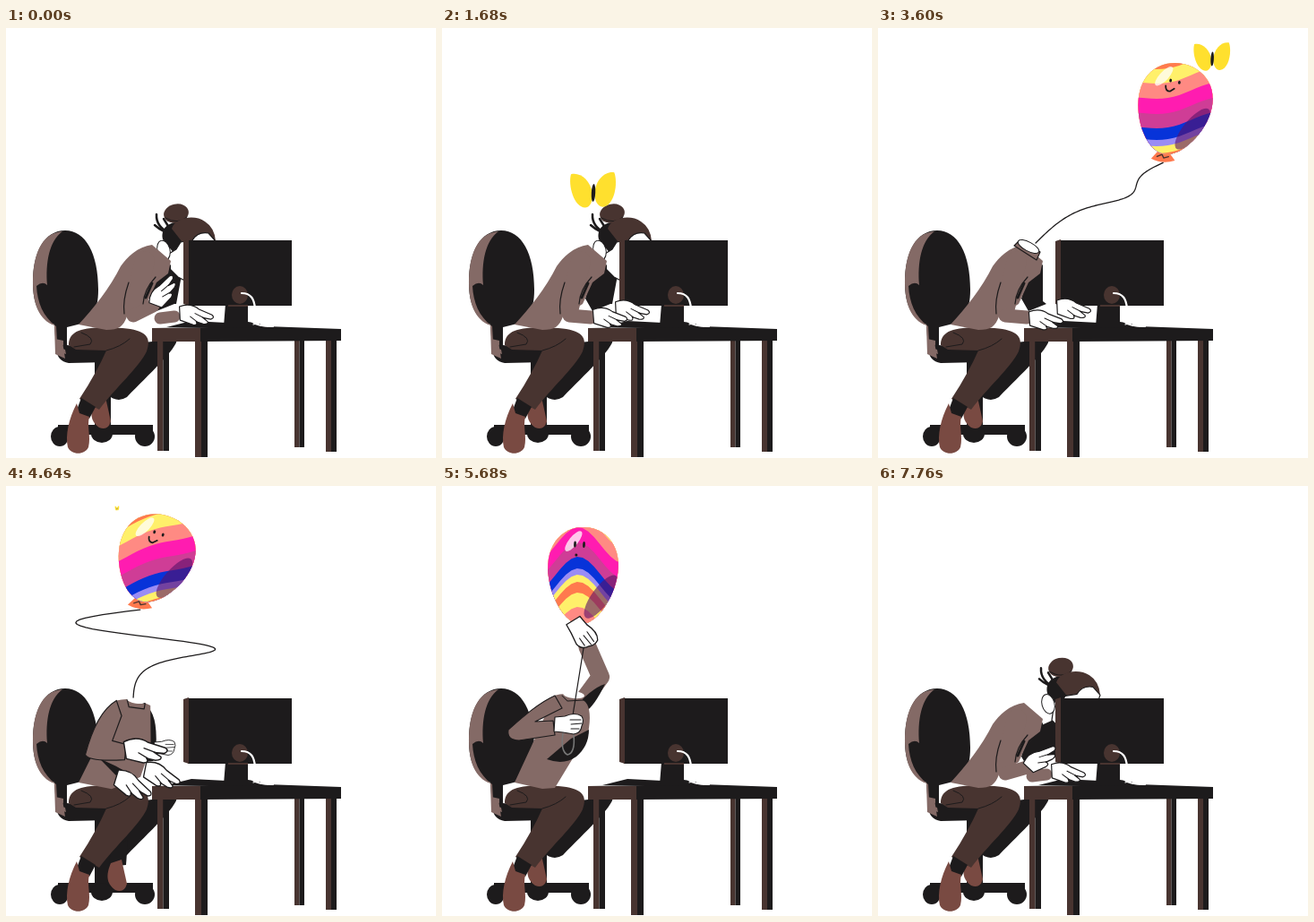
Write an HTML page that moves like this. It is 480 px wide and 480 px high and loops after 7.84 s.

```html
<!DOCTYPE html>
<html lang="en">
<head>
<meta charset="utf-8">
<title>Balloon head at the desk</title>
<style>
html, body { margin: 0; width: 100%; height: 100%; overflow: hidden; background: #fff }
svg { display: block; width: 100vw; height: 100vh }
</style>
</head>
<body>
<svg id="stage" viewBox="0 0 480 480"></svg>
<script>
const LOOP = 7840;
const K = '#1d1b1c', D = '#483430', S = '#846a66', SHOE = '#794a42', W = '#fff';
const PINK = '#ff1cb0', PLUM = '#cf3d96', CORAL = '#ff8a83', BLUE = '#0733d9',
  LILAC = '#9a8cf5', SUN = '#fff06a', ORANGE = '#ff7a4e', GOLD = '#ffe02e';

// Drawing helpers
const fill = (d, c, extra = '') => `<path d="${d}" fill="${c}" ${extra}/>`;
const line = (d, c = K, w = 1.2) => `<path d="${d}" fill="none" stroke="${c}" stroke-width="${w}" stroke-linecap="round" stroke-linejoin="round"/>`;
const inked = (d, c = W) => fill(d, c, `stroke="${K}" stroke-width="1.2" stroke-linejoin="round"`);
const oval = (x, y, rx, ry, c, rot = 0, extra = '') =>
  `<ellipse cx="${x}" cy="${y}" rx="${rx}" ry="${ry}" fill="${c}" transform="rotate(${rot} ${x} ${y})" ${extra}/>`;
const box = (x, y, w, h, c) => `<rect x="${x}" y="${y}" width="${w}" height="${h}" fill="${c}"/>`;
const group = (tf, s) => `<g transform="${tf}">${s}</g>`;

// Motion helpers
const mix = (a, b, u) => a + (b - a) * u;
const clamp = u => Math.max(0, Math.min(1, u));
const ramp = (t, a, b) => { const u = clamp((t - a) / (b - a)); return u * u * (3 - 2 * u); };
const bell = (t, mid, width) => Math.exp(-(((t - mid) / width) ** 2));
const trace = (n, f) => 'M' + Array.from({ length: n + 1 }, (_, i) => f(i / n).map(v => v.toFixed(2))).join('L');

// Smooth interpolation through rows of [time, ...values]
function key(t, rows) {
  let i = 0;
  while (i < rows.length - 2 && t >= rows[i + 1][0]) i++;
  const a = rows[i], b = rows[i + 1], z = rows[i - 1] || a, c = rows[i + 2] || b;
  const h = b[0] - a[0], u = clamp((t - a[0]) / h), v = 1 - u;
  return a.slice(1).map((p, n) => {
    const j = n + 1, q = b[j];
    const m0 = (q - z[j]) / (b[0] - z[0]) * h, m1 = (c[j] - p) / (c[0] - a[0]) * h;
    return v * v * (1 + 2 * u) * p + u * v * v * m0 + u * u * (3 - 2 * u) * q - u * u * v * m1;
  });
}

// Furniture
const chair =
  fill('M66 226C89 226 103 252 103 292C103 317 95 327 80 331L68 334V354L104 358 190 348Q190 358 160 372L70 374Q57 372 56 358L54 331C36 324 30 306 30 284C30 250 43 226 66 226Z', K) +
  fill('M63 227C38 229 30 256 30 284C30 308 37 326 54 332L55 364 66 369 63 350 57 349 56 333C41 322 35 306 34 288Q41 282 46 287C44 262 48 238 63 227Z', S) +
  fill('M55 347L64 349 64 354 56 352ZM56 356L66 359 67 364 57 361Z', S) +
  box(99, 370, 18, 78, K) + box(58, 443, 106, 11, K) +
  oval(60, 456, 10, 11, K) + oval(155, 456, 11, 11, K) + oval(107, 453, 12, 10, K);

const legs = apart =>
  fill('M145 352L191 347C191 358 160 386 135 412Q124 419 113 409Z', K) +
  group(apart ? 'translate(18 5)' : '',
    fill('M99 398L118 390 116 418 97 420Z', K) + fill('M99 416C94 428 93 438 104 446Q114 450 117 439L111 412Z', SHOE)) +
  fill('M70 354C70 338 84 332 130 335C156 337 163 345 157 361C149 378 122 402 104 426L82 414C95 394 105 376 112 360L78 359Z', D) +
  line('M84 340Q100 346 94 353L76 356M112 360Q128 356 138 347', K, 1) +
  fill('M84 413L100 423 93 436 78 429Z', K) +
  fill('M79 419C70 436 66 455 69 468C73 477 88 477 92 468C95 455 90 446 93 434L82 430Z', SHOE);

const leg = (x, y, w, h) => box(x, y, w / 2, h, D) + box(x + w / 2, y, w / 2, h, K);
const desk =
  leg(169, 348, 13, 124) + leg(322, 347, 11, 121) + leg(357, 347, 12, 126) + leg(211, 348, 14, 131) +
  fill('M163 335L290 333 374 336V349L217 350Z', K) + fill('M163 335H217V350H163Z', D) +
  fill('M179 334L207 327 246 329 300 335Z', K) +
  fill('M245 308H270V328L284 330V333H243Z', K) +
  box(203, 237, 116, 73, K) + fill('M198 238L204 236V310L198 308Z', D) +
  oval(261, 298, 9, 10, D) + box(248, 309, 22, 2, D) +
  line('M263 296C274 296 277 303 278 313M274 327Q280 333 298 333', W, 2.2) + line('M276 331Q285 327 292 333', W);

// Hands: wrist at the origin, fingers toward +x
const hand = (x, y, rot = 0, s = 1) => group(`translate(${x} ${y}) rotate(${rot}) scale(${s})`,
  inked('M0-7C8-11 16-10 22-6L37-1Q41 2 36 4L27 3 33 7Q34 10 28 10L20 8Q23 12 17 12L2 8Z') + line('M18-1L28 3M13 3L21 8', K, 1));
const fist = (x, y, rot = 0, s = 1) => group(`translate(${x} ${y}) rotate(${rot}) scale(${s})`,
  inked('M-15-8L-4-9Q8-14 15-9Q18-4 15 2Q14 10 6 11L-6 9-16 8Z') + line('M2-5L14-5M3 0L15-1M3 5L12 5', K, 1));

// Seated poses
const leanTorso =
  fill('M168 276L184 264 184 305 188 308 168 316 160 302Z', K) +
  fill('M163 242C147 244 135 256 128 266C116 290 97 314 81 331L112 337C126 337 131 333 135 322L157 308 168 284 181 274 184 260Z', S);

const sleeve = (x, y) => line('M155 260L142 312', S, 22) + line(`M142 321L${x} ${y}`, S, 15) +
  line('M167 278Q154 292 153 308M137 284Q130 304 132 319') + line('M163 285L156 301', K, 3);

const bentHead =
  fill('M168 272L190 262 196 276 190 308 166 308Z', K) +
  line('M168 208Q167 222 184 230M166 220Q176 229 186 229M176 213L184 226', K, 2.5) +
  fill('M175 236C172 224 182 216 192 217L204 240 188 252Z', K) +
  oval(190, 207, 14, 10.5, D, -12) + line('M178 212Q192 220 202 211', K, 1) +
  fill('M185 224C189 211 211 208 222 216Q233 223 234 238H196Z', D) +
  inked('M190 247L195 239 208 237Q214 227 226 229L234 238 215 290 192 278 180 266 182 252Z') +
  oval(176, 248, 7, 11, W, -15, `stroke="${K}"`);

const frowningHead =
  oval(160, 200, 15, 10, D, -14) +
  fill('M146 204C136 214 140 232 149 240L166 214Z', K) + line('M144 206Q152 200 158 204', K, 3) +
  fill('M147 220C148 200 180 194 196 217L198 232 150 240Z', D) +
  inked('M151 238Q156 218 180 215Q194 212 198 224C199 248 186 266 173 270Q156 266 151 250Z') +
  oval(142, 239, 8, 11, W, 0, `stroke="${K}"`) +
  line('M163 235L174 240M181 242L188 238M178 245L181 252 176 254M167 262Q173 258 178 262', K, 1.6) +
  oval(169, 244, 3, 1.6, K) + oval(184, 246, 2.4, 1.5, K);

const poses = {
  typing(t, tap) {
    const up = t < LOOP / 2 ? 1 - ramp(t, 300, 760) : ramp(t, 7640, LOOP);
    const far = ramp(t, 300, 760) * (1 - ramp(t, 6900, 7400));
    const shift = 14 * ramp(t, 1700, 2120) - 10 * (1 - ramp(t, 6720, 7000)) * (t > LOOP / 2);
    const x = 166 - 2 * up, y = 323 - 13 * up;
    return {
      back: group(`translate(${shift} ${-Math.abs(shift) / 3})`, bentHead) + leanTorso,
      front: line('M172 324L188 322', S, 13 * (1 - far)) + hand(193, 318 - tap * .5 - far * 6, 5) +
        sleeve(x, y) + hand(x + 2, y + tap * (1 - up), 3 - 65 * up)
    };
  },
  headless: (t, tap) => ({
    back: leanTorso + inked('M152 243L158 237 181 250 177 259Z', S) + oval(168, 244, 13, 5, W, 28, `stroke="${K}"`),
    front: hand(199, 312 - tap, 5) + sleeve(166, 323) + hand(168, 323 + tap, 3)
  }),
  rising: (t, tap) => ({
    back: fill('M155 245Q168 252 167 290L164 306 140 308Z', K) +
      fill('M122 239Q140 234 160 244L161 290 150 324 118 338 81 331 98 296Z', S) +
      fill('M104 304L122 312 144 324 130 330Z', K) +
      inked('M122 239C104 250 94 276 88 300Q92 308 132 305L134 288 118 284 128 256Z', S) +
      inked('M134 238L154 242 153 248 136 246Z', S) + oval(144, 239, 10, 3, W, 8),
    front: fist(176, 291, 0, .75) + hand(131, 293 + tap, -2, 1.25) + hand(154, 315, 18, 1.1) + hand(122, 324, 24, 1.15)
  }),
  pulling(t) {
    const reach = ramp(t, 4900, 5200), b = flight(t);
    const x = mix(150, b.knot[0], reach), y = mix(215, b.knot[1] + 10, reach);
    const ey = Math.max(213, y + 22);
    return {
      back: line(`M152 247L177 ${ey}L${x + 8} ${y + 15}`, S, 20) +
        fill(`M146 250Q166 226 182 ${ey + 8}Q170 246 160 252Z`, K) +
        fill('M125 234Q146 228 160 241Q168 250 163 276L126 337 112 338 81 331 100 290Z', S) +
        fill('M117 305L144 282 164 272Q164 290 150 302Q136 312 117 305Z', K) +
        inked('M126 234C108 242 90 258 74 272Q72 284 86 284L126 278 124 262 104 263 134 248Z', S) +
        oval(147, 233, 12, 4, W, 6) + line('M134 234L140 240 158 239', K, 1),
      front: line(`M${x + 4} ${y + 16}L146 256`) + line('M135 276Q132 296 140 300Q149 298 147 278', '#777', 1.6) +
        fist(141, 266) + fist(x + 2, y, 55, 1.1)
    };
  },
  holding(t, tap) {
    const shake = tap * .4;
    return {
      back: fill('M160 254L198 266 197 278 160 272Z', K) +
        fill('M104 266Q130 252 158 264Q165 276 158 292L126 336 110 336 79 330 94 296Z', S) +
        fill('M112 308L134 292 158 289Q150 306 138 312Q124 317 112 308Z', K) +
        group(`translate(${shake} 0)`, frowningHead),
      front: inked('M74 242Q96 239 134 243L137 262 82 264Q68 254 74 242Z', S) + line('M98 263H135', K, 3) +
        hand(139 + shake, 254, -58) + group(`translate(${194 + shake} 264) scale(.7)`, inked('M6 2L-4-4-6-16 0-26 6-30Z'))
    };
  }
};
const acts = [[0, 'typing'], [2120, 'headless'], [4440, 'rising'], [4900, 'pulling'], [6120, 'holding'], [6720, 'typing']];

// Balloon: an egg whose lower half slides sideways as it squeezes past the monitor
const BANDS = [[SUN, 16], [CORAL, 17], [PINK, 17], [PLUM, 16], [BLUE, 13], [LILAC, 7], [SUN, 8], [ORANGE, 12]];

function flight(t) {
  const [x, y, turn, size] = key(t, [[2120, 212, 238, 0, .35], [2800, 320, 179, 0, 1], [3500, 340, 95, 12, 1],
    [4640, 166, 81, 19, 1], [5680, 157, 100, 3, 1], [6120, 170, 230, 5, .6]]);
  const bend = bell(t, 2800, 350), r = turn * Math.PI / 180, c = Math.cos(r), s = Math.sin(r);
  const sx = size * (1 + turn / 200), sy = size * (1 - turn / 200);
  const skin = u => {
    const a = (u + .25) * 2 * Math.PI, cos = Math.cos(a), sin = Math.sin(a);
    const py = 55 * sin;
    const half = Math.sign(cos) * Math.abs(cos) ** (1 - .4 * bend) * (38 + 3 * bend) * (1 - .2 * sin * (1 - bend));
    const px = half - bend * (4.5 + 17.5 * Math.tanh((py - 25) / 14));
    return [sx * px * c - sy * py * s, sx * px * s + sy * py * c];
  };
  const [kx, ky] = skin(0);
  return { x, y, turn, sx, sy, bend, skin, knot: [x + kx, y + ky] };
}

function string(t, [kx, ky]) {
  const [nx, ny] = t < 4440 ? [176, 240] : [142, 238];
  const slack = 15 + 105 * bell(t, 4640, 450);
  const free = 1 - bell(t, 2800, 350);
  return line(trace(80, v => [
    mix(nx, kx, v) + free * slack * (1 - .45 * v) * Math.sin(2 * Math.PI * v ** 2.9),
    mix(ny, ky + 10, v) - 8 * Math.sin(2 * Math.PI * v)
  ]), K, 1.3);
}

function balloon(t) {
  if (t < 2120 || t >= 6120) return '';
  const { x, y, turn, sx, sy, bend, skin, knot } = flight(t);
  const [top, slope, swell] = key(t, [[2120, -60, 0, 4], [2800, -50, 0, 7], [4640, -38, -.35, -3], [5680, -59, 0, -20], [6120, -50, 0, 0]]);
  const wave = trace(24, u => {
    const px = 150 * u - 75;
    return [px, slope * px + swell * Math.cos((px + 5) / 16)];
  }) + 'V150H-75Z';
  let bands = '', by = top - 35;
  for (let i = 5; i < 18; i++) {
    const [color, h] = BANDS[i % 8];
    bands += group(`translate(0 ${by})`, fill(wave, i == 8 && t < 3600 ? PLUM : color));
    by += h;
  }
  const mouth = bend > .4 ? fill('M-10 14Q0 18 8 11Q3 26-7 26Q-4 20-10 14Z', K)
    : turn > 8 ? line('M-8 7Q-7 13-2 12L2 8', K, 1.8) : oval(-2, 12, 1.5, 1.5, K);
  const eye = turn > 8 || bend > .4 ? 2 : 3.5;
  const face = group(`translate(${-6 + turn * .5 + bend * 18} ${-36 + turn * .4 + bend * 4}) rotate(${turn})`,
    oval(-4, 0, 1.4, eye, K) + oval(6, 0, 1.4, eye, K) + mouth);
  const tie = group(`translate(${knot}) rotate(${turn * .4}) scale(${sx} ${sy})`,
    fill('M-4-5H4L13 7Q0 13-12 7Z', t < 3600 ? GOLD : t < 5000 ? ORANGE : BLUE) + line('M-6 4l5-3 2 4 5-2', D, 1.4));
  return (t < 4900 ? string(t, knot) : '') + tie + group(`translate(${x} ${y})`,
    `<clipPath id="skin"><path d="${trace(60, skin)}Z"/></clipPath><g clip-path="url(#skin)">` + bands +
    group(`scale(${sx} ${sy})`, oval(20, 24, 10, 29, '#5b1268', 35, 'opacity=".6"') +
      oval(-10, -39, 5, 14, W, 38, 'opacity=".75"')) + '</g>' + face);
}

function butterfly(t) {
  if (t < 880 || t > 4760) return '';
  const [x, y, s] = key(t, [[880, 30, 142, .4], [1680, 169, 182, 1], [2800, 280, 45, 1], [3500, 384, 34, .85], [4640, 124, 25, .12]]);
  const w = .76 + .24 * Math.cos((t - 1680) / 160 * Math.PI), h = 1.3 - w * .3;
  const wing = fill('M1 3C3-13 14-22 24-20C28-8 23 17 10 18C4 18 1 10 1 3Z', GOLD);
  return group(`translate(${x} ${y}) scale(${s})`,
    group(`scale(${-w} ${h}) rotate(3)`, wing) + group(`scale(${w} ${h}) rotate(-2)`, wing) +
    oval(0, 2, 2.2 * w, 10, K, 3));
}

const stage = document.getElementById('stage');
function draw(now) {
  const t = Math.floor(now % LOOP / 40) * 40;
  const [start, name] = acts.filter(a => a[0] <= t).pop();
  const tap = t > 6960 && t < 7120 ? 0 : 2 * Math.sin(t / 55);
  const body = poses[name](t, tap);
  const side = { headless: 0, typing: start ? -1 : 0 }[name] ?? 1;
  const swing = 7 * side * Math.exp((start - t) / 90);
  const lean = s => group(`rotate(${swing} 90 335)`, s);
  stage.innerHTML = chair + legs(name == 'rising') + balloon(t) + lean(body.back) + desk + lean(body.front) + butterfly(t);
  requestAnimationFrame(draw);
}
requestAnimationFrame(draw);
</script>
</body>
</html>
```
